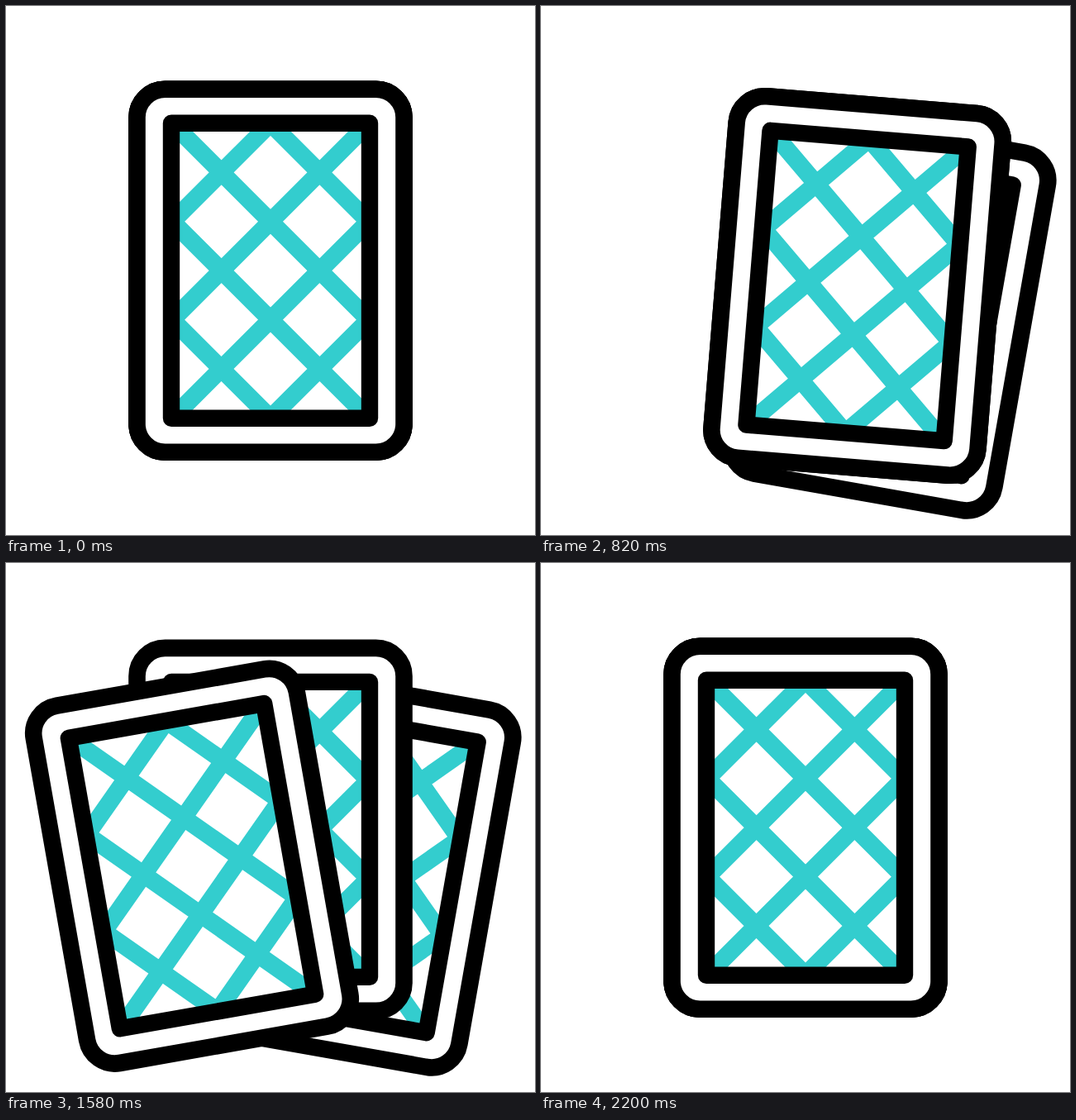
Write an HTML page that moves like this. It is 640 by 640 pixels and loops after 2.4 s.

```html
<!DOCTYPE html>
<html lang="en">
<head>
<meta charset="utf-8">
<title>Fanning cards</title>
<style>
  html, body { margin: 0; width: 100%; height: 100%; overflow: hidden; background: #fff; }
  svg { display: block; width: 100vw; height: 100vh; }
</style>
</head>
<body>
<svg viewBox="0 0 640 640">
  <defs>
    <clipPath id="panel"><rect x="-115" y="-173" width="230" height="346"/></clipPath>
    <g id="card">
      <rect x="-161.5" y="-219.5" width="323" height="439" rx="34" fill="#fff" stroke="#000" stroke-width="20.6"/>
      <path id="lattice" clip-path="url(#panel)" fill="none" stroke="#33cdce" stroke-width="21.2"/>
      <rect x="-120" y="-178.5" width="240" height="357" fill="none" stroke="#000" stroke-width="20.4" stroke-linejoin="round"/>
    </g>
  </defs>
  <use class="card" href="#card"/>
  <use class="card" href="#card"/>
  <use class="card" href="#card"/>
</svg>
<script>
const LOOP = 2400;

// Diagonals x - y = c and x + y = c
document.getElementById('lattice').setAttribute('d',
  [-3, -1, 1, 3].map(n => {
    const c = n * 59.4, r = 300;
    return `M${c - r} ${-r}L${c + r} ${r}M${c - r} ${r}L${c + r} ${-r}`;
  }).join(''));

function bezier(x1, y1, x2, y2) {
  const at = (a, b, s) => 3 * a * s * (1 - s) ** 2 + 3 * b * s * s * (1 - s) + s ** 3;
  return u => {
    if (u <= 0 || u >= 1) return u <= 0 ? 0 : 1;
    let lo = 0, hi = 1;
    for (let i = 0; i < 24; i++) {
      const mid = (lo + hi) / 2;
      if (at(x1, x2, mid) < u) lo = mid; else hi = mid;
    }
    return at(y1, y2, lo);
  };
}

const linear = u => u;
const HOME = [0, 0, 0], RIGHT = [101.5, 51.4, 10], MIDDLE = [0, 2.2, 0], LEFT = [-95, 46.5, -10];

// Poses are [x, y, angle]; via bends the path, ease drives the position
const legs = [
  { start: 208, end: 608, from: HOME, to: RIGHT, via: [50.75, 25.7], ease: bezier(.33, 0, .6, 1) },
  { start: 612, end: 1004, from: RIGHT, to: MIDDLE, via: [58, 1], ease: bezier(.33, 0, .67, .67) },
  { start: 1004, end: 1400, from: MIDDLE, to: LEFT, via: [-59.5, 0], ease: linear }
];
const gather = { start: 1800, end: 2200, ease: bezier(.33, .33, .5, 1) };

const progress = (t, span) => Math.min(1, Math.max(0, (t - span.start) / (span.end - span.start)));

// The card at this depth follows one leg more than the one below it
function pose(t, depth) {
  let i = depth;
  while (i > 0 && t < legs[i].start) i--;
  const leg = legs[i], u = progress(t, leg), p = leg.ease(u), q = 1 - p;
  const keep = 1 - gather.ease(progress(t, gather));
  const along = k => q * q * leg.from[k] + 2 * p * q * leg.via[k] + p * p * leg.to[k];
  const angle = leg.from[2] + (leg.to[2] - leg.from[2]) * u;
  return [along(0), along(1), angle].map(v => v * keep);
}

const cards = document.querySelectorAll('.card');
const began = performance.now();

function draw(now) {
  const t = Math.max(0, now - began) % LOOP;
  cards.forEach((card, depth) => {
    const [x, y, angle] = pose(t, depth);
    card.setAttribute('transform', `translate(${320 + x} ${320.2 + y}) rotate(${angle})`);
  });
  requestAnimationFrame(draw);
}
draw(began);
</script>
</body>
</html>
```
